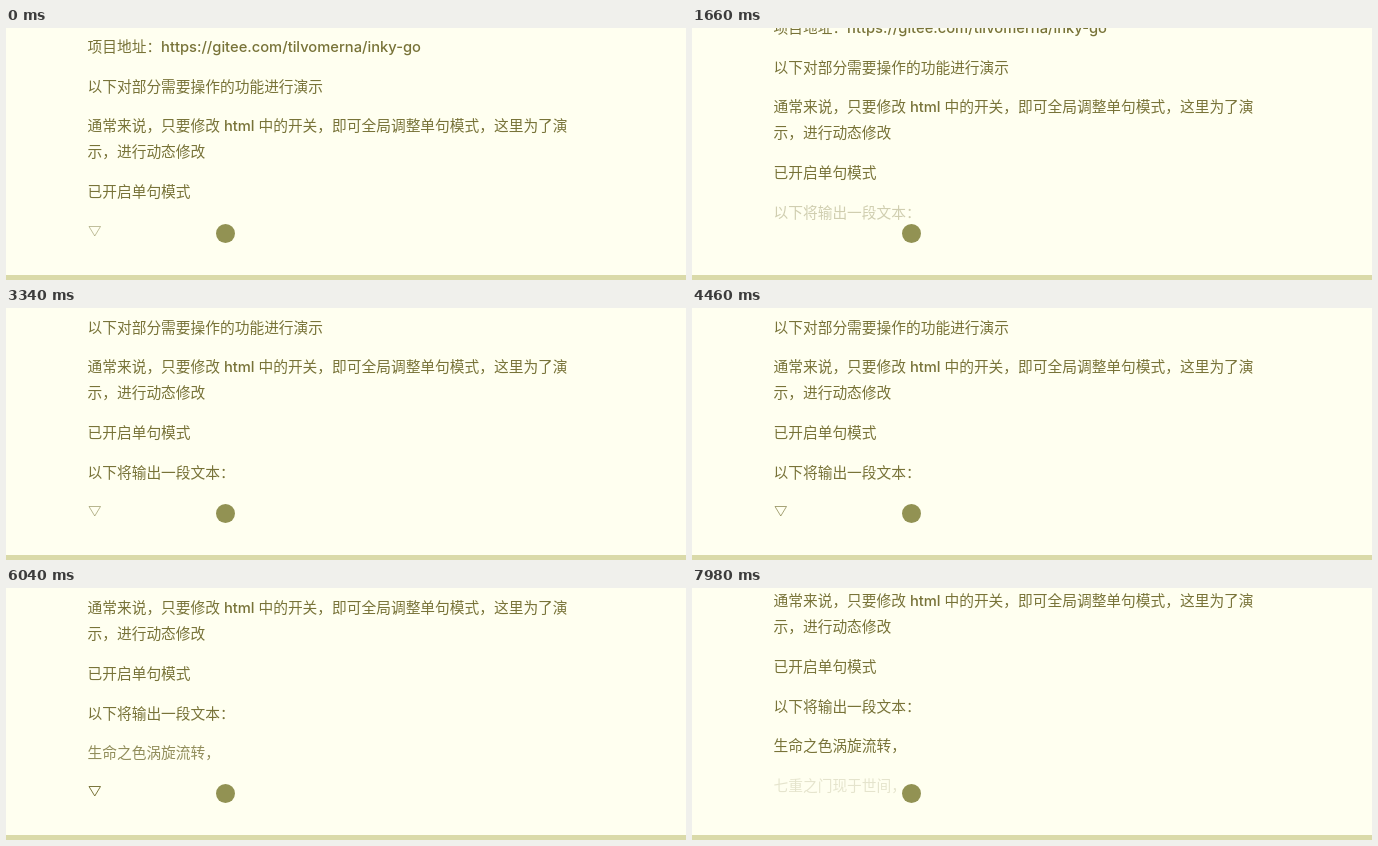
These frames come from a looping animation (680 by 252 pixels, 8 s). An HTML page:

```html
<!DOCTYPE html>
<html lang="zh-CN">
<head>
<meta charset="utf-8">
<style>
  html, body { margin: 0; width: 100%; height: 100%; overflow: hidden; background: #fffff0; }
  #stage { position: relative; width: 680px; height: 252px; overflow: hidden; }
  #story { position: absolute; left: 0; top: 0; }
  #story div {
    position: absolute; left: 81.5px; height: 26px; white-space: nowrap;
    font: 500 14.72px/26px Inter, "Noto Sans CJK SC", "Noto Sans CJK", sans-serif;
    color: #787338;
  }
  svg { position: absolute; left: 0; top: 0; }
  #edge { position: absolute; left: 0; top: 247px; width: 680px; height: 5px; background: #dadaa9; }
</style>
</head>
<body>
<div id="stage">
  <div id="story"></div>
  <svg width="680" height="252">
    <path id="more" d="M83 198.5H94.5L88.75 208Z" fill="none" stroke="#787338"/>
    <circle id="ripple" cx="219.5" cy="205.5" fill="none" stroke="#92914f" stroke-width="1.5"/>
    <circle cx="219.5" cy="205.5" r="9.5" fill="#929253"/>
  </svg>
  <div id="edge"></div>
</div>
<script>
const LOOP = 8000, SCROLL_MS = 1250, FADE_MS = 1800, STEP = 39.2;
const RIPPLE_MS = 220, BLINK_MS = 3000;

// The first beat happened before the loop begins.
const beats = [
  { click: -2600, start: -2460 },
  { click: 880, start: 1040 },
  { click: 4480, start: 4589 },
  { click: 7370, start: 7649 },
];

// [vertical centre, text, beat that reveals it]
const lines = [
  [19, "项目地址：https://gitee.com/tilvomerna/inky-go"],
  [58.7, "以下对部分需要操作的功能进行演示"],
  [98.3, "通常来说，只要修改 html 中的开关，即可全局调整单句模式，这里为了演"],
  [124.3, "示，进行动态修改"],
  [164, "已开启单句模式"],
  [203.7, "以下将输出一段文本：", 1],
  [243.3, "生命之色涡旋流转，", 2],
  [282.6, "七重之门现于世间，", 3],
];

const byId = id => document.getElementById(id);
const story = byId("story"), more = byId("more"), ripple = byId("ripple");
const clamp = x => Math.min(1, Math.max(0, x));
const smooth = x => x * x * (3 - 2 * x);

const fading = [];
for (const [y, text, beat] of lines) {
  const row = document.createElement("div");
  row.textContent = text;
  row.style.top = Math.round(y - 13) + "px";
  story.append(row);
  if (beat) fading.push({ row, start: beats[beat].start });
}

function draw(t) {
  const scrolled = beats.slice(1).reduce(
    (sum, b) => sum + STEP * smooth(clamp((t - b.start) / SCROLL_MS)), 0);
  story.style.top = -Math.round(scrolled) + "px";

  for (const { row, start } of fading) row.style.opacity = clamp((t - start) / FADE_MS);

  const age = t - beats.filter(b => b.start <= t).pop().start;
  const blink = 0.7 + 0.3 * Math.cos((age - SCROLL_MS) / BLINK_MS * 2 * Math.PI);
  more.style.opacity = age < 1000 ? 0 : blink;

  const hit = beats.find(b => t >= b.click && t < b.click + RIPPLE_MS);
  const spread = hit ? (t - hit.click) / RIPPLE_MS : 0;
  ripple.setAttribute("r", 9 + 13 * spread);
  ripple.style.opacity = hit ? 0.5 * (1 - spread) : 0;
}

const origin = performance.now();
function tick() {
  draw((performance.now() - origin) % LOOP);
  requestAnimationFrame(tick);
}
draw(0);
requestAnimationFrame(tick);
</script>
</body>
</html>
```
